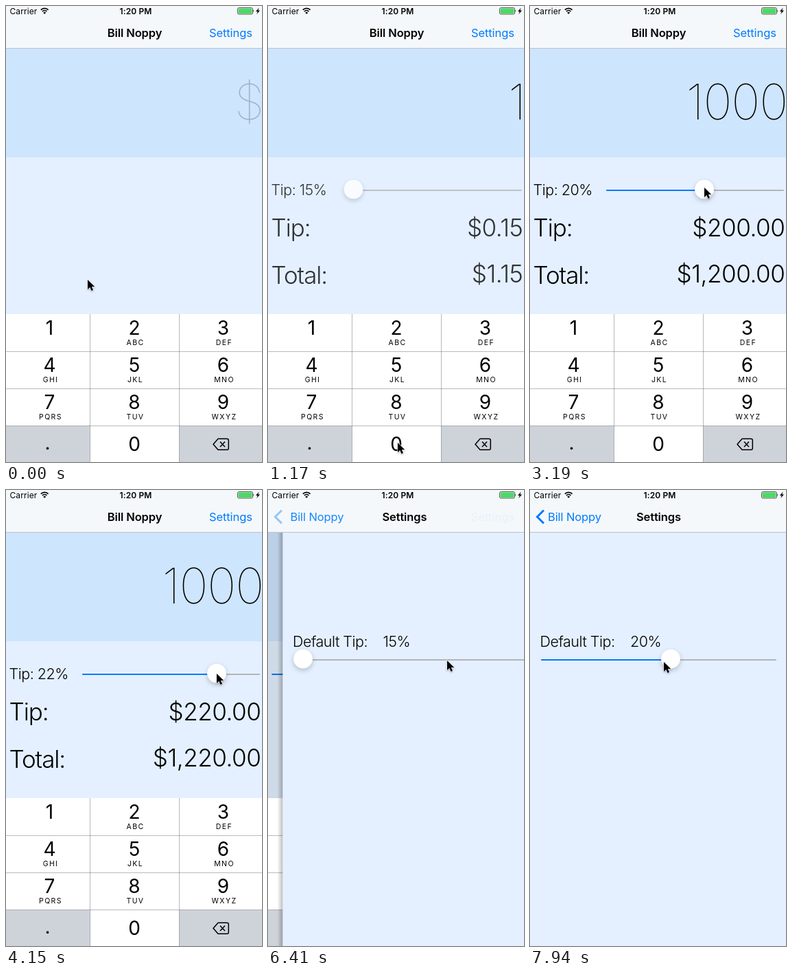
Write an HTML page that moves like this. It is 373 px wide and 663 px high and loops after 8000 ms.

```html
<!DOCTYPE html>
<html lang="en">
<head>
<meta charset="utf-8">
<title>Tip calculator</title>
<style>
  html, body { margin: 0; width: 100%; height: 100%; overflow: hidden; background: #e4f0ff; }
  svg { display: block; width: 373px; height: 663px; font-family: Inter, Roboto, sans-serif; }
  .mid { text-anchor: middle; }
  .end { text-anchor: end; }
  .status { font-size: 12px; letter-spacing: .1px; }
  .nav { font-size: 16.5px; letter-spacing: -.1px; }
  .bold { font-weight: 600; }
  .blue { fill: #007aff; }
  .bill { font-size: 71px; font-weight: 140; letter-spacing: -1.1px; }
  .big { font-size: 35px; font-weight: 300; letter-spacing: -1.1px; }
  .sum { letter-spacing: -.45px; }
  .label { font-size: 21.5px; font-weight: 300; letter-spacing: -.5px; }
  .digit { font-size: 28px; }
  .letters { font-size: 10.5px; letter-spacing: 1.4px; }
  .thumb { fill: #fff; stroke: rgba(0,0,0,.06); stroke-width: .5; filter: drop-shadow(0 3px 3.5px rgba(0,0,0,.2)); }
</style>
</head>
<body>
<svg viewBox="0 0 373 663">
  <defs>
    <linearGradient id="edge">
      <stop offset="0" stop-opacity="0"/>
      <stop offset="1" stop-opacity=".25"/>
    </linearGradient>
  </defs>

  <g id="main">
    <rect width="373" height="663" fill="#e4f0ff"/>
    <rect y="62" width="373" height="158" fill="#cee5fe"/>
    <text id="bill" class="bill end" x="375" y="165"></text>
    <g id="panel">
      <text id="rate" class="label" x="4.5" y="275"></text>
      <g id="tipSlider"></g>
      <text class="big" x="4.5" y="335">Tip:</text>
      <text id="tip" class="big sum end" x="371.4" y="334.5"></text>
      <text class="big" x="4.5" y="404">Total:</text>
      <text id="total" class="big sum end" x="371.4" y="401.5"></text>
    </g>
    <rect id="dim" width="373" height="663" opacity="0"/>
  </g>

  <g id="keys"></g>

  <g id="next">
    <rect x="-8" y="62" width="8" height="601" fill="url(#edge)"/>
    <rect width="373" height="663" fill="#e4f0ff"/>
    <text class="label" x="14.5" y="228">Default Tip:</text>
    <text id="rate2" class="label" x="146" y="228"></text>
    <g id="defSlider"></g>
  </g>

  <rect width="373" height="61" fill="#f4f8fa"/>
  <rect y="61" width="373" height="1" fill="#b9c3cc"/>
  <g class="nav">
    <text id="title" class="bold mid" x="187.5" y="45">Bill Noppy</text>
    <text id="open" class="blue" x="296" y="45">Settings</text>
    <g id="back">
      <path id="chevron" d="M20 29.5L10.5 39L20 48.5" fill="none" stroke="#007aff" stroke-width="3"/>
      <text id="backText" class="blue" x="26" y="45">Bill Noppy</text>
      <text id="title2" class="bold mid" x="187.5" y="45">Settings</text>
    </g>
  </g>

  <g class="status">
    <text x="5.5" y="11.5">Carrier</text>
    <text class="bold mid" x="189" y="11.5">1:20 PM</text>
    <g fill="none" stroke="#000" stroke-width="1.7">
      <path d="M50.8 5.6a7.6 7.6 0 0 1 10.8 0M52.9 7.9a4.7 4.7 0 0 1 6.6 0"/>
    </g>
    <path d="M56.2 11.8l-2-2.1a2.9 2.9 0 0 1 4 0z"/>
    <rect x="337.5" y="2.5" width="22" height="9.5" rx="2" fill="none" stroke="#333" stroke-width=".8"/>
    <rect x="338.5" y="3.5" width="20" height="7.5" rx="1" fill="#4cd964"/>
    <path d="M360.5 5.5q1.6 1.7 0 3.5z"/>
    <path d="M368.6 2.5L364 8h2.6l-1.4 4L370 6.4h-2.7z"/>
  </g>

  <path id="cursor" d="M0 0V14L3.3 11L5.5 16L8 15L5.9 10H10.2Z" stroke="#fff" stroke-width="1.2"
        paint-order="stroke" style="filter:drop-shadow(0 1px 1px rgba(0,0,0,.3))"/>
</svg>

<script>
const $ = id => document.getElementById(id);
const LOOP = 8000, TICK = 118.3, LEAD = 16, LAST = 67;

// Cursor waypoints: tick, x, y
const PATH = [
  [0, 119, 398], [2, 64, 470], [4, 66, 473], [7, 170, 624], [9, 189, 635], [16, 189, 635],
  [17, 178, 563], [20, 126, 268], [21, 124.5, 264], [22, 145, 264], [23, 178, 264], [25, 178, 264],
  [26, 225, 264], [27, 254, 264], [30, 254, 264], [31, 272, 265], [32, 284, 266], [34, 284, 266],
  [35, 307, 267], [40, 307, 267], [41, 300, 320], [44, 250, 610], [46, 250, 610],
  [47, 342, 205], [48, 350, 92], [50, 335, 42], [51, 328, 44], [53, 262, 230], [54, 261, 248],
  [57, 110, 262], [59, 22, 252], [60, 20, 250], [62, 52, 250], [65, 160, 250], [67, 195, 250]
];

// First tick at which each bill amount shows
const BILLS = [[4, 1], [11, 10], [12, 100], [13, 1000]];

function cursorAt(k) {
  const i = Math.max(1, PATH.findIndex(p => p[0] >= k));
  const [a, b] = [PATH[i - 1], PATH[i]];
  const f = (k - a[0]) / (b[0] - a[0]);
  return { x: a[1] + (b[1] - a[1]) * f, y: a[2] + (b[2] - a[2]) * f };
}

function makeSlider(id, left, right, y) {
  $(id).innerHTML = `
    <rect x="${left}" y="${y}" width="${right - left}" height="2" rx="1" fill="#b2b5ba"/>
    <rect x="${left}" y="${y}" height="2" rx="1" class="blue"/>
    <circle cy="${y - .5}" r="14" class="thumb"/>`;
  const [, fill, thumb] = $(id).children;
  const min = left + 13.5, max = right - 13.5;
  return x => {
    x = Math.min(max, Math.max(min, x));
    fill.setAttribute('width', x > min + 1 ? x - left : 0);
    thumb.setAttribute('cx', x);
    return Math.floor(15 + 10 * (x - min) / (max - min));
  };
}

function makeKeys() {
  const cols = [0, 122.5, 252.5, 373], mids = [63.5, 187, 316.5];
  const letters = ['', 'ABC', 'DEF', 'GHI', 'JKL', 'MNO', 'PQRS', 'TUV', 'WXYZ'];
  let out = '';
  for (let i = 0; i < 12; i++) {
    const c = i % 3, r = Math.floor(i / 3), y = 448 + r * 54.2;
    const grey = i === 9 || i === 11;
    out += `<rect id="key${i}" x="${cols[c]}" y="${y}" width="${cols[c + 1] - cols[c]}" height="55"
      fill="${grey ? '#ced3da' : '#fff'}"/>`;
    if (i < 9) {
      out += `<text class="digit mid" x="${mids[c]}" y="${478 + r * 54}">${i + 1}</text>
        <text class="letters mid" x="${mids[c] + 1.5}" y="${493 + r * 54}">${letters[i]}</text>`;
    }
  }
  out += `<text class="digit mid" x="60.5" y="645">.</text>
    <text class="digit mid" x="187" y="647">0</text>
    <path d="M309 629.2H322a2.3 2.3 0 0 1 2.3 2.3V643a2.3 2.3 0 0 1-2.3 2.3H309L302 637.2Z
      M312 633.5l7 7.4M319 633.5l-7 7.4" fill="none" stroke="#000" stroke-width="1.5" stroke-linejoin="round"/>
    <path d="M0 502.5H373M0 556.5H373M0 610.5H373M122.5 448V663M252.5 448V663"
      stroke="#000" stroke-opacity=".27" fill="none"/>`;
  $('keys').innerHTML = out;
}

const setTip = makeSlider('tipSlider', 111, 370, 267);
const setDefault = makeSlider('defSlider', 16, 359, 246);
makeKeys();

const text = (id, s) => { $(id).textContent = s; };
const show = (id, on) => { $(id).style.display = on ? '' : 'none'; };
const shift = (id, x, y = 0) => $(id).setAttribute('transform', `translate(${x} ${y})`);
const press = (id, on) => $(id).setAttribute('fill', on ? '#ced3da' : '#fff');
const money = n => '$' + n.toLocaleString('en-US', { minimumFractionDigits: 2, maximumFractionDigits: 2 });
const easeInOut = f => f * f * (3 - 2 * f);

function draw(k) {
  const cur = cursorAt(k);
  shift('cursor', cur.x, cur.y);
  show('cursor', k !== 45 && k !== 46);

  const bill = BILLS.reduce((v, [at, n]) => k >= at ? n : v, 0);
  text('bill', bill || '$');
  $('bill').setAttribute('fill-opacity', bill ? 1 : .22);
  $('panel').setAttribute('opacity', easeInOut(Math.min(1, Math.max(0, (k - 4) / 8.5))));
  press('key0', k === 3);
  press('key10', k === 11 || k === 13);

  const rate = setTip(k < 21 ? 0 : k <= 40 ? cur.x : 307);
  const tip = bill * rate / 100;
  text('rate', `Tip: ${rate}%`);
  text('tip', money(tip));
  text('total', money(bill + tip));

  // Push to the settings page
  const pushed = k >= 54;
  const x = !pushed ? 373 : k < 57 ? 21.5 * .25 ** (k - 54) : 0;
  const done = 1 - x / 373, rest = pushed ? x / 21.5 : 0;
  shift('main', -112 * done);
  $('dim').setAttribute('opacity', .1 * done);
  shift('keys', x - 373);
  shift('next', x);
  show('main', x > 0);
  show('keys', x > 0);
  show('next', pushed);
  show('title', !pushed);
  show('back', pushed);
  $('open').setAttribute('opacity', pushed ? .05 * rest : k === 51 ? .35 : 1);
  $('chevron').setAttribute('opacity', 1 - .6 * rest);
  $('backText').setAttribute('opacity', 1 - .1 * rest);
  shift('backText', 6.5 * rest);
  shift('title2', 11.5 * rest);

  text('rate2', setDefault(k < 60 ? 0 : cur.x + 10) + '%');
}

const start = performance.now();
let shown = -1;
function frame() {
  const t = (performance.now() - start) % LOOP;
  const k = Math.min(LAST, Math.floor((t + LEAD) / TICK));
  if (k !== shown) draw(shown = k);
  requestAnimationFrame(frame);
}
frame();
</script>
</body>
</html>
```
